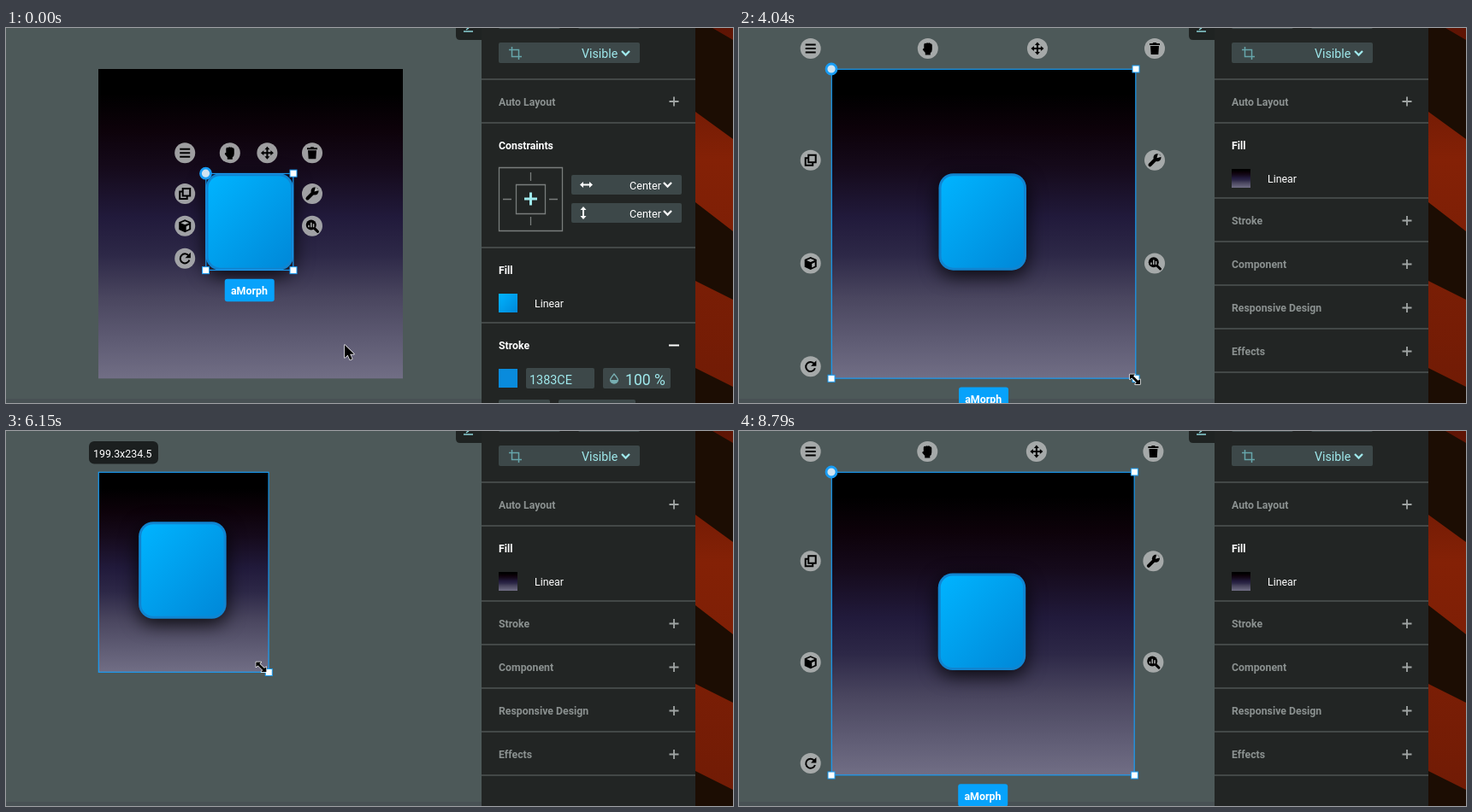
Write an HTML page that moves like this. It is 850 px wide and 439 px high and loops after 9.64 s.

```html
<!DOCTYPE html>
<html lang="en">
<head>
<meta charset="utf-8">
<title>Resizing a frame</title>
<style>
  html, body { margin: 0; width: 100%; height: 100%; overflow: hidden; background: #4d5959; }
  svg { display: block; width: 100vw; height: 100vh; }
  text { font: 12.4px Roboto, Inter, sans-serif; fill: #fff; }
  .bold { font-weight: 700; }
  .dim { fill: #8b9190; }
  .cyan { fill: #9fe9ec; }
  .field { fill: #3d4849; }
  .rule { stroke: #434847; stroke-width: 2; }
  .line { fill: none; stroke: #000; stroke-width: 2; }
  .tick { fill: none; stroke: #797d7c; stroke-width: 1.3; }
  .blue { stroke: #189cf4; }
  .handle { fill: #fff; stroke-width: 1; }
  .cursor { fill: #000; stroke: #fff; stroke-width: 1.3; stroke-linejoin: round; paint-order: stroke; }
  #card { filter: drop-shadow(0 6px 11px rgba(0, 0, 0, .85)); }
</style>
</head>
<body>
<svg viewBox="0 0 850 439" preserveAspectRatio="none">
  <defs>
    <linearGradient id="night" x2="0" y2="1">
      <stop offset=".08" stop-color="#000"/>
      <stop offset=".2" stop-color="#0d020a"/>
      <stop offset=".32" stop-color="#150a1b"/>
      <stop offset=".48" stop-color="#211a3b"/>
      <stop offset=".6" stop-color="#2d2847"/>
      <stop offset=".74" stop-color="#4a465f"/>
      <stop offset=".88" stop-color="#5f5c74"/>
      <stop offset="1" stop-color="#716e85"/>
    </linearGradient>
    <linearGradient id="sky" x2="1" y2="1">
      <stop stop-color="#00b4ff"/>
      <stop offset="1" stop-color="#0088d8"/>
    </linearGradient>
    <linearGradient id="rust" x2="0" y2="1">
      <stop stop-color="#5e1404"/>
      <stop offset=".35" stop-color="#842106"/>
      <stop offset="1" stop-color="#701b05"/>
    </linearGradient>
    <g id="menu"><path class="line" d="M-6-4.5H6M-6 0H6M-6 4.5H6"/></g>
    <g id="hand"><path d="M-4.5-5Q-3.5-7-2-6Q-1-7.5 .5-6.3Q2-7.3 3-5.8Q5-6 5 -4V1Q5 4 3 5V7.5H-3V5L-6 1.5Q-6-.5-4.5 0Z"/></g>
    <g id="move"><path class="line" d="M-5 0H5M0-5V5"/><path d="M0-7.5L3-4H-3ZM0 7.5L3 4H-3ZM-7.5 0L-4-3V3ZM7.5 0L4-3V3Z"/></g>
    <g id="trash"><path d="M-6-6H-2.5L-1.5-7H1.5L2.5-6H6V-4H-6ZM-5-3H5L4.3 7H-4.3Z"/></g>
    <g id="copy"><path class="line" stroke-width="1.8" d="M-2.5-6H6V2.500H-2.500ZM-2.500-2.500H-6V6H2.500V2.500"/></g>
    <g id="cube"><path d="M0-7.500L7-4.500V4.300L0 7.500L-7 4.300V-4.500Z"/><path d="M-4.800-3.600L0-1.600L4.800-3.600L0-5.600ZM1.500 .400L5-1.200V3.300L1.500 5Z" fill="#aeb1b1"/></g>
    <g id="reset"><path class="line" d="M4.300-3.200A5.500 5.500 0 1 0 5.200 2"/><path d="M6.700-7V-.500H.300Z"/></g>
    <g id="wrench"><path d="M-5.500 5.500L2-2" stroke="#000" stroke-width="4" stroke-linecap="round"/><circle cx="3" cy="-3" r="4.500"/><path d="M2.500-2.500L4-8L8-4Z" fill="#aeb1b1"/></g>
    <g id="zoom"><circle cx="-1.200" cy="-1.200" r="6"/><path d="M3 3L6.500 6.500" stroke="#000" stroke-width="3" stroke-linecap="round"/><path d="M-4 1.500V-1M-1.200 1.500V-4M1.600 1.500V-2.500" stroke="#aeb1b1" stroke-width="1.500"/></g>
  </defs>

  <rect width="556" height="439" fill="#4d5959"/>
  <rect y="434" width="556" height="5" fill="#485154"/>
  <path d="M526 0H556V14H531Q526 14 526 9Z" fill="#1f2322"/>
  <path d="M535 4H546M538 2L541 0" stroke="#8cd3d7" stroke-width="1.500"/>

  <rect id="frame" x="108" y="48" fill="url(#night)"/>
  <g id="card">
    <rect width="102.500" height="113.500" rx="17" fill="#1085d1"/>
    <rect x="3" y="3" width="96.500" height="107.500" rx="14" fill="url(#sky)"/>
  </g>
  <g id="selection"></g>
  <g id="sizeLabel">
    <rect x="97" y="12" width="81" height="26.500" rx="6" fill="#1b1f1f"/>
    <text id="size" x="102" y="31"></text>
  </g>

  <rect x="806" width="44" height="439" fill="url(#rust)"/>
  <path d="M806 0H826L850 14V130L806 98ZM806 204L850 238V318L806 296ZM806 398L850 420V439H806Z" fill="#1c0d03"/>
  <rect x="556" width="250" height="439" fill="#222524"/>
  <g id="common"></g>
  <g id="cardPanel"></g>
  <g id="framePanel"></g>

  <path id="arrow" class="cursor" d="M0 0V15L3.600 11.800L6.200 17.500L8.800 16.300L6.200 10.800H11Z"/>
  <path id="resize" class="cursor" d="M-6-5.500H0L-1.900-3.600L3.500 1.800L6 .200V6H0L1.700 3.900L-3.800-1.600L-6 .300Z"/>
</svg>
<script>
const LOOP = 9640, LEFT = 108, TOP = 48;
const $ = id => document.getElementById(id);

const text = (x, y, s, cls = '', size = 12.4) =>
  `<text x="${x}" y="${y}" class="${cls}" style="font-size:${size}px">${s}</text>`;
const title = (y, s, cls = '') => text(576, y, s, 'bold ' + cls, 12.3);
const rule = y => `<path class="rule" d="M556 ${y}H806"/>`;
const field = (x, y, w, h = 24) => `<rect class="field" x="${x}" y="${y}" width="${w}" height="${h}" rx="2"/>`;
const swatch = (y, fill) => `<rect x="576" y="${y}" width="22" height="22" fill="${fill}"/>`;
const stroke = (d, color, width = 2) => `<path d="${d}" fill="none" stroke="${color}" stroke-width="${width}"/>`;
const chevron = (x, y, color) => stroke(`M${x - 4.5} ${y - 2}L${x} ${y + 2.5}L${x + 4.5} ${y - 2}`, color, 2.3);
const plusRow = (y, s) => title(y + 4.5, s, 'dim') + stroke(`M775.500 ${y}H786.500M781 ${y - 5.5}V${y + 5.5}`, '#a0a5a4', 1.8);

$('common').innerHTML =
  field(576, -20, 72, 21) + field(669, -20, 72, 21) + field(576, 17, 165) +
  stroke('M591.500 22V33.500H603M588 25.500H599.500V37', '#66a5aa', 1.5) +
  text(673, 34.5, 'Visible', 'cyan', 14.2) + chevron(724.5, 29, '#9fe9ec') +
  rule(60) + plusRow(86, 'Auto Layout') + rule(111);

$('cardPanel').innerHTML =
  title(142, 'Constraints') +
  '<path class="tick" d="M576.500 163.500H650.500V237.500H576.500ZM596.500 183.500H630.500V217.500H596.500ZM613.500 169V179M613.500 221V231M581 200.500H591M635 200.500H645"/>' +
  stroke('M606 200H621M613.500 192.500V207.500', '#9fe9ec', 3) +
  [172, 205].map(y => field(661, y, 129, 23) + text(729, y + 16.5, 'Center', '', 12.6) + chevron(773.5, y + 11, '#fff')).join('') +
  '<path d="M671 183.500L675 180V182.500H682V180L686 183.500L682 187V184.500H675V187ZM675 209L678.500 213H676V220H678.500L675 224L671.500 220H674V213H671.500Z" fill="#fff"/>' +
  rule(257) + title(288, 'Fill') + swatch(311, 'url(#sky)') + text(618, 327, 'Linear') +
  rule(345) + title(376, 'Stroke') + stroke('M775 371.500H787', '#fff') +
  swatch(399, '#098bdc') + field(608, 398, 80) + text(612, 417, '1383CE', 'cyan', 14.4) +
  field(698, 398, 79) + stroke('M711 405Q706.500 410.500 706.500 412A4.500 4 0 0 0 715.500 412Q715.500 410.500 711 405Z', '#78afb2', 1.3) +
  '<path d="M707 412H715A4 4 0 0 1 707 412Z" fill="#78afb2"/>' +
  text(724, 418, '100 %', 'cyan', 17.6) + field(576, 435, 60) + field(646, 435, 90);

$('framePanel').innerHTML =
  title(142, 'Fill') + swatch(165, 'url(#night)') + text(618, 181, 'Linear') +
  ['Stroke', 'Component', 'Responsive Design', 'Effects']
    .map((s, i) => rule(199 + 51 * i) + plusRow(225.5 + 51 * i, s)).join('') + rule(403);

const button = (name, x, y) => `<g transform="translate(${x} ${y})">
  <circle r="12" fill="#b2b4b4" opacity=".88"/><use href="#${name}"/></g>`;
const handle = (x, y) => `<rect class="handle blue" x="${x - 4}" y="${y - 4}" width="8" height="8"/>`;
const outline = (x, y, w, h) =>
  `<rect class="blue" x="${x + .3}" y="${y + .3}" width="${w - .5}" height="${h - .5}" fill="none" stroke-width="1.200"/>`;

function selected(x, y, w, h) {
  const right = x + w, bottom = y + h, l = x - 24.3, r = right + 22, t = y - 24;
  const across = (r - l + 9) / 3, row2 = t + h / 3 + 10, row3 = row2 + h / 3;
  const mid = x + w / 2;
  return outline(x, y, w, h) + handle(right, y) + handle(x, bottom) + handle(right, bottom) +
    `<circle class="blue" cx="${x}" cy="${y}" r="6" fill="#cfe4f2" stroke-width="2.800"/>` +
    button('menu', l, t) + button('hand', l + across, t) + button('move', r - across, t) + button('trash', r, t) +
    button('copy', l, row2) + button('cube', l, row3) + button('reset', l, row3 + h / 3) +
    button('wrench', r, row2) + button('zoom', r, row3) +
    `<rect x="${mid - 29}" y="${bottom + 10.2}" width="58" height="26.500" rx="3" fill="#07a2fb"/>` +
    `<g text-anchor="middle">${text(mid - .3, bottom + 28.5, 'aMorph', 'bold')}</g>`;
}

// Each key is [time, a, b]; values run straight between keys.
function track(keys, t) {
  const i = keys.findIndex(k => k[0] > t);
  if (i === 0) return keys[0].slice(1);
  if (i < 0) return keys[keys.length - 1].slice(1);
  const [p, q] = [keys[i - 1], keys[i]], f = (t - p[0]) / (q[0] - p[0]);
  return [1, 2].map(n => p[n] + (q[n] - p[n]) * f);
}

const sizes = [
  [4820, 356, 362.3], [5100, 344, 349], [5500, 314, 319], [5740, 277, 288], [5800, 264.3, 278.1],
  [5860, 252, 271], [6100, 206, 240], [6350, 173, 213], [6500, 169, 209], [6610, 182.5, 218.2],
  [6670, 200, 235], [6730, 245, 270], [6790, 292, 306], [6850, 320, 328], [6960, 341, 343],
  [7080, 351.9, 352.1], [7380, 354.4, 355]
];
const pointer = [
  [2210, 396, 371], [2330, 412, 378], [2480, 445, 394], [2600, 459, 402], [2680, 463, 404],
  [2920, 463, 404], [2970, 465, 411], [3150, 465, 412], [3450, 465, 412], [3630, 464, 412],
  [3930, 460, 408], [4040, 463, 411]
];
const exit = [[8390, 461, 402], [8500, 490, 410], [8650, 550, 428], [8790, 590, 460]];

const place = (el, x, y) => el.setAttribute('transform', `translate(${x} ${y})`);
const show = (id, on) => $(id).style.display = on ? '' : 'none';

function draw(t) {
  const [w, h] = track(sizes, t);
  const cardX = LEFT + w / 2 - 52.5, cardY = TOP + h / 2 - 59;
  const onCard = t < 1800, dragging = t >= 4820 && t < 8090;

  $('frame').setAttribute('width', w);
  $('frame').setAttribute('height', h);
  place($('card'), cardX, cardY);
  $('selection').innerHTML =
    onCard ? selected(cardX, cardY, 102.5, 113.5) :
    dragging ? outline(LEFT, TOP, w, h) + handle(LEFT + w, TOP + h) :
    selected(LEFT, TOP, w, h);

  $('size').textContent = w.toFixed(1) + 'x' + h.toFixed(1);
  show('sizeLabel', dragging);
  show('cardPanel', onCard);
  show('framePanel', !onCard);

  let at;
  if (t < 4820) at = track(pointer, t);
  else if (t < 8390) {
    const lead = track(sizes, t + 60);
    at = [LEFT + lead[0] - 1, TOP + lead[1]];
  } else at = track(exit, t);
  const isArrow = t < 3500 || (t >= 6560 && t < 6700) || t >= 8390;
  show('arrow', isArrow);
  show('resize', !isArrow);
  place($(isArrow ? 'arrow' : 'resize'), ...at);
}

const start = performance.now();
function tick() {
  draw((performance.now() - start) % LOOP);
  requestAnimationFrame(tick);
}
tick();
</script>
</body>
</html>
```
